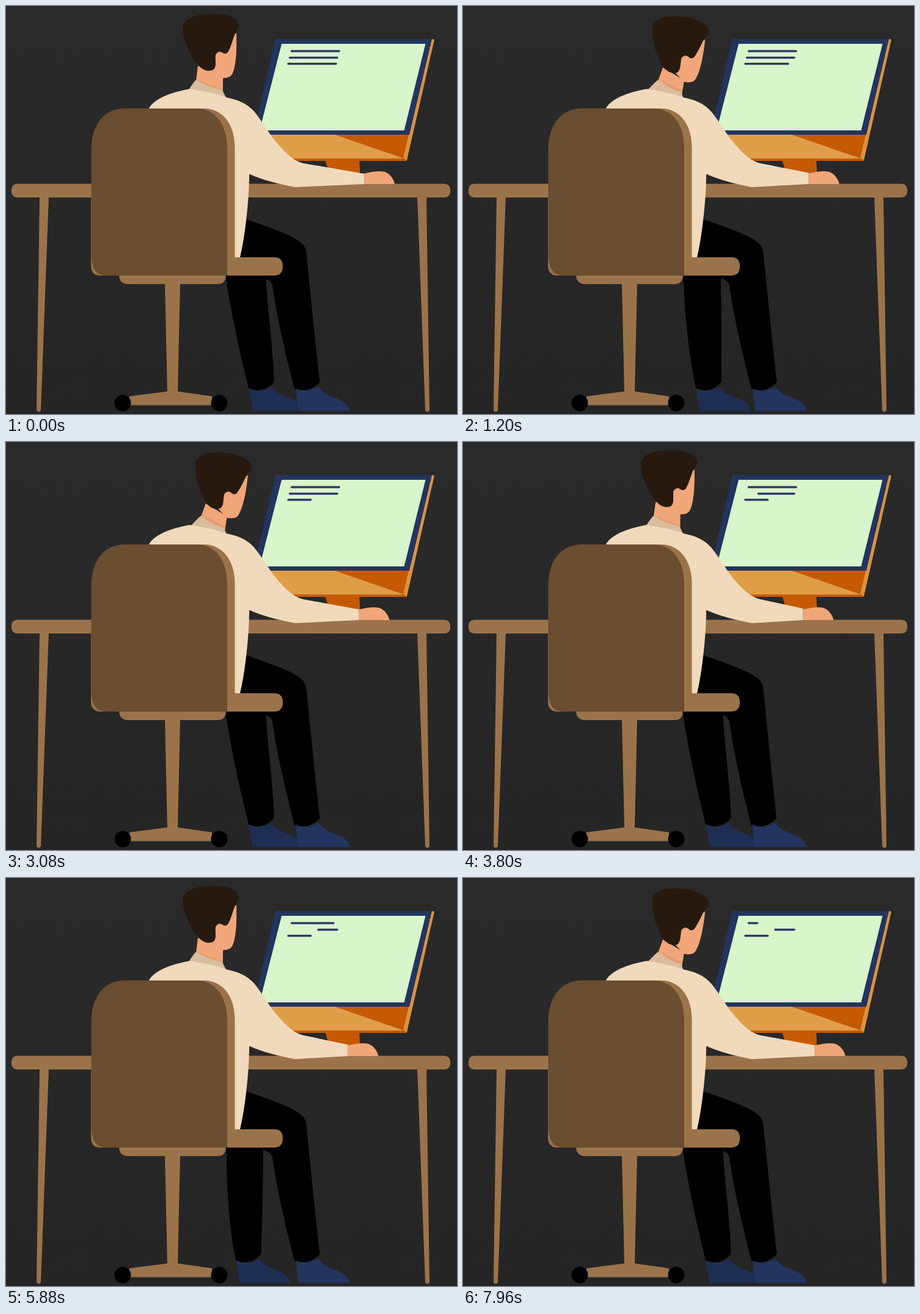
Recreate the animation shown at these times as an HTML page. Size 738 px wide and 669 px high, loop 8000 ms.

```html
<!DOCTYPE html>
<html lang="en">
<head>
<meta charset="utf-8">
<title>Working at a desk</title>
<style>
  html, body { margin: 0; width: 100%; height: 100%; overflow: hidden; background: #272727; }
  svg { display: block; width: 100vw; height: 100vh; background: linear-gradient(#2a2a2a, #252525); }
  .tan { fill: #9b734b; }
  .navy { fill: #23345f; }
  .shirt { fill: #f1dabb; }
  .skin { fill: #f0a678; }
  .text { stroke: #33386b; stroke-width: 3.6; stroke-linecap: round; }
</style>
</head>
<body>
<svg viewBox="0 0 738 669">
  <!-- monitor -->
  <path fill="#c65a04" d="M521 249H578L580 290H534Z"/>
  <path fill="#c65a04" d="M440 247H653L656 254H440Z"/>
  <path fill="#e09d48" d="M401 211H660L651 250H395Z"/>
  <path fill="#c65a04" d="M538 211H661L651 250Z"/>
  <path fill="#dc9240" d="M696 54L701 55L656 253L650 249Z"/>
  <path class="navy" d="M441 54H697L660 211H404Z"/>
  <path fill="#d8f5cb" d="M451 62H686.500L651.500 204H415Z"/>
  <line id="line1" class="text" y1="74" y2="74"/>
  <line id="line2" class="text" y1="84.700" y2="84.700"/>
  <line id="line3" class="text" y1="94.700" y2="94.700"/>

  <!-- desk -->
  <path class="tan" d="M55 312H70L57 663Q53.500 668 50 663Z"/>
  <path class="tan" d="M673 312H688L693 663Q689.500 668 686 663Z"/>
  <rect class="tan" x="9" y="291.500" width="718" height="22.500" rx="9"/>

  <!-- legs -->
  <path id="leftLeg"/>
  <path id="leftShoe" fill="#1f2e54" d="M397 627Q416 636 435 625C449 646 484 641 486 664H404Z"/>
  <path id="rightLeg"/>
  <path id="rightShoe" class="navy" d="M474 627Q492 636 511 624C525 646 560 641 562 664H478Z"/>

  <!-- person -->
  <path id="neck" class="skin"/>
  <path id="neckShade" fill="#e39d70"/>
  <g id="head">
    <path class="skin" d="M340 45H377C378 75 376 100 370 112Q366 119 352 118L330 100Z"/>
    <path fill="#27190e" d="M289 39C288 20 311 13 338 13C357 13 372 17 377 23Q384 29 379 38C372 47 371 62 363 76Q358 80 355 77Q348 72 343 80C342 91 345 98 340 104Q333 108 325 105C309 98 291 63 289 39Z"/>
  </g>
  <path id="collar" fill="#dabd9e"/>
  <path id="hand" class="skin" d="M584 275L599 272Q612 270 620 272C628 275 635 284 636 292H584Z"/>
  <path class="shirt" d="M233 169C244 149 275 141 300 136Q336 141 361 150C390 156 403 166 415 185L430 207L440 270L398 276C398 318 391 380 383 412H340L230 300Z"/>
  <path id="arm" class="shirt"/>
  <path id="cuff" stroke="#cfae8c" stroke-width="1"/>

  <!-- chair -->
  <path class="tan" d="M185 440H360Q360 456 346 456H200Q185 456 185 440Z"/>
  <path class="tan" d="M260 455H285L281 632L337 640V654.500H202V640L264 632Z"/>
  <circle cx="191" cy="651" r="13.500"/>
  <circle cx="349" cy="651" r="13.500"/>
  <path class="tan" d="M195 168H324C355 168 374.500 195 374.500 232V412H439Q453 412 453 427Q453 442 438 442H155Q139 442 139 425V300Z"/>
  <path fill="#6b4d30" d="M139.500 235C139.500 195 160 168 195 168H311C344 168 362 195 362 235V442H161Q141 440 139.500 412Z"/>
</svg>
<script>
const LOOP = 8000;
const $ = id => document.getElementById(id);
const clamp = v => Math.min(1, Math.max(0, v));
const ramp = (t, from, to) => clamp((t - from) / (to - from));
const ease = (t, from, to) => (1 - Math.cos(Math.PI * ramp(t, from, to))) / 2;
const swing = (t, a, b, c, d) => ease(t, a, b) - ease(t, c, d);
const mix = (a, b, p) => a + (b - a) * p;
const shape = (id, d) => $(id).setAttribute('d', d);
const shift = (id, x) => $(id).setAttribute('transform', `translate(${x} 0)`);

function textLine(id, x1, x2) {
  $(id).setAttribute('x1', x1 + 1.5);
  $(id).setAttribute('x2', x2 - 1.5);
}

function drawLegs(left, right) {
  shape('leftLeg', `M361 442V455C${370 + left * .45} 510 ${385 + left * .9} 580 ${397 + left} 627
    Q${420 + left} 637 ${438.5 + left} 617C${438 + left * .9} 570 ${428 + left * .35} 500 ${425 + left * .2} 440Z`);
  shape('rightLeg', `M392 349C420 360 470 374 486 391Q491 397 492 409
    C${497 + right * .15} 460 ${507 + right * .7} 560 ${513.5 + right} 617
    Q${494 + right} 636 ${472 + right} 628C${456 + right * .85} 565 ${442 + right * .2} 505 436 458
    Q434 450 422 446L360 452V412H378Z`);
  shift('leftShoe', left);
  shift('rightShoe', right);
}

function drawHead(p) {
  const m = (a, b) => mix(a, b, p);
  $('head').setAttribute('transform',
    `translate(${16 * p} ${5 * p}) rotate(${8 * p} 340 70)`);
  shape('neck', `M${m(314, 327)} ${m(98, 101)}L${m(311, 319)} 123L340 142L${m(355, 358)} 146
    L${m(355, 362)} ${m(112, 122)}Z`);
  shape('neckShade', `M${m(313, 321)} ${m(121, 119)}L${m(355, 359)} ${m(137, 139)}V143L${m(330, 338)} 137Z`);
  shape('collar', `M${m(299, 302)} 138Q${m(305, 313)} ${m(127, 126)} ${m(311, 319)} 121
    Q${m(330, 336)} ${m(133, 136)} ${m(354, 357)} ${m(138, 141)}L361 152Q330 150 300 142Z`);
}

function drawArm(x) {
  const cuff = 586 + x, top = 275 + x * .07;
  shape('arm', `M415 185L430 207C446 230 467 254 487 258L${cuff} ${top}V292L473 297
    C445 292 420 285 398 275.500Z`);
  shape('cuff', `M${cuff} ${top}V292`);
  shift('hand', x);
}

function draw(t) {
  drawHead(swing(t, 100, 1100, 3000, 4000) + ease(t, 6000, 7000));
  drawLegs(
    -22 * (swing(t, 590, 1540, 2000, 2650) + swing(t, 5060, 6010, 6400, 7000)),
    -17.5 * swing(t, 3700, 4600, 4900, 5500));
  drawArm(-30 * (swing(t, 800, 1450, 1560, 2500) + swing(t, 2900, 3400, 3760, 4700)
    + swing(t, 4850, 5350, 5660, 6700) + ease(t, 7760, 8260)));
  textLine('line1', 466, mix(546.5, 483, ramp(t, 5720, 6840)));
  textLine('line2', mix(463, 509.5, ramp(t, 3460, 4300)), 543.5);
  textLine('line3', 460.5, mix(541.5, 500, ramp(t, 1060, 1790)));
}

function frame() {
  draw(performance.now() % LOOP);
  requestAnimationFrame(frame);
}
frame();
</script>
</body>
</html>
```
